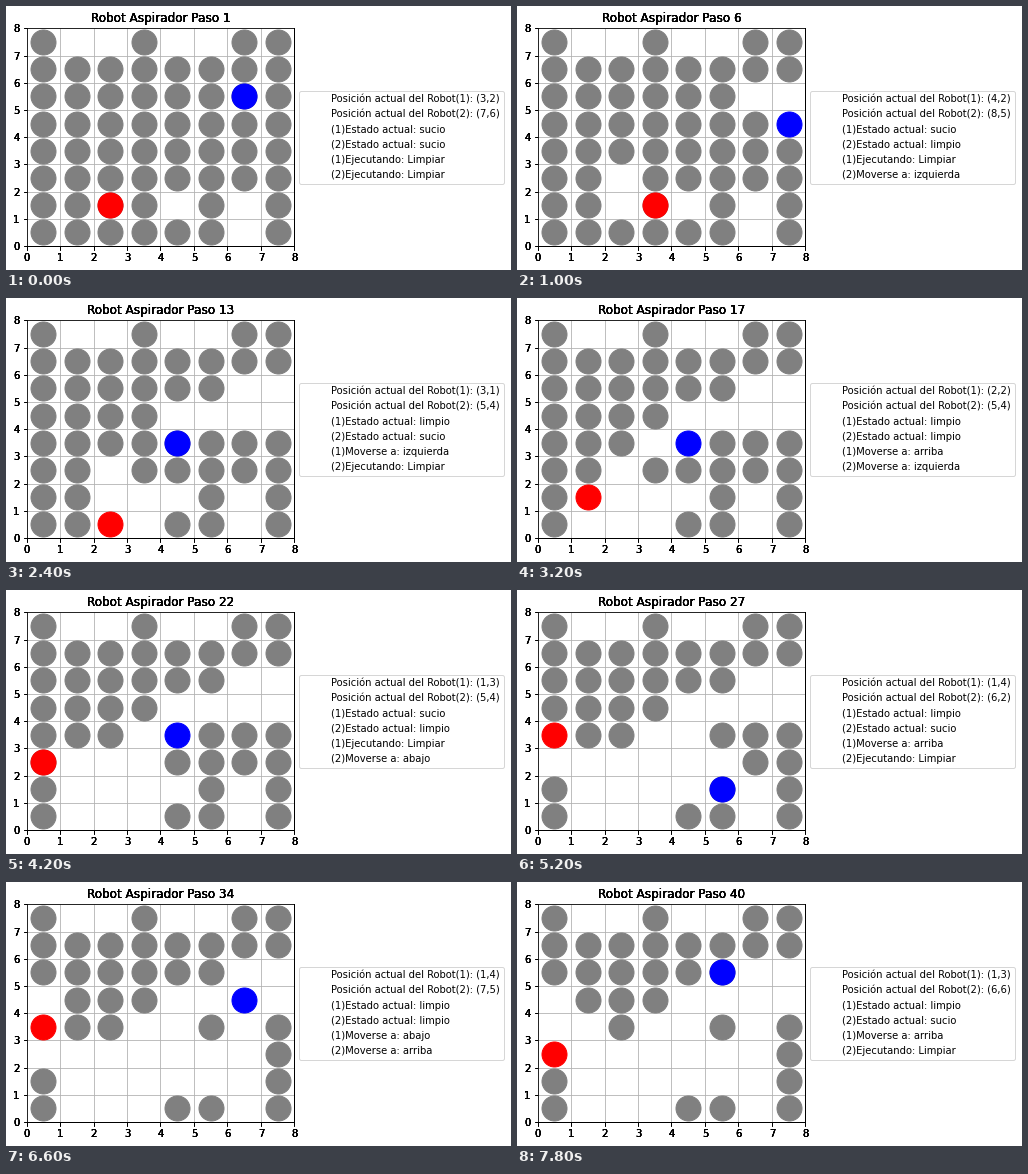
A matplotlib script that plays this animation: 505x264 px, repeating every 8000 ms.

```python
import matplotlib.pyplot as plt
from matplotlib.animation import FuncAnimation
from matplotlib.lines import Line2D

W, H, DPI = 505, 264, 72
STEPS, STEP_MS = 40, 200
LAYERS = 5  # stacked axes give the heavy title and tick labels

# Rows from top (y = 8) to bottom (y = 1); '#' is a dirty cell.
ROOM = ["#..#..##", "########", "########", "########",
        "########", "########", "####.#.#", "######.#"]

# One letter per step: C cleans, the others move.
MOVES = {"U": (0, 1, "arriba"), "D": (0, -1, "abajo"),
         "L": (-1, 0, "izquierda"), "R": (1, 0, "derecha")}
ROBOTS = [
    ((3, 2), "CUCDRCDCUDLCLCUCUCDULCUCDUUCDDUUDDURCLDU"),
    ((7, 6), "CRCDCLCLCLCDCLCRLDCURDCRCDCRUCUCUURLRLLC"),
]


def simulate():
    """Return dirt, robot positions and actions for every step."""
    dirt = {(x + 1, 8 - row) for row, line in enumerate(ROOM)
            for x, cell in enumerate(line) if cell == "#"}
    spots = [start for start, _ in ROBOTS]
    history = []
    for step in range(STEPS):
        acts = [plan[step] for _, plan in ROBOTS]
        history.append((sorted(dirt), list(spots), acts))
        for i, act in enumerate(acts):
            x, y = spots[i]
            if act == "C":
                dirt.discard((x, y))
            else:
                dx, dy, _ = MOVES[act]
                spots[i] = (x + dx, y + dy)
    return history


def legend_lines(spots, acts):
    where = [f"Posición actual del Robot({i}): ({x},{y})"
             for i, (x, y) in enumerate(spots, 1)]
    state = [f"({i})Estado actual: {'sucio' if a == 'C' else 'limpio'}"
             for i, a in enumerate(acts, 1)]
    doing = [f"({i})" + ("Ejecutando: Limpiar" if a == "C"
                         else f"Moverse a: {MOVES[a][2]}")
             for i, a in enumerate(acts, 1)]
    return where + state + doing


def centers(cells):
    return [x - 0.5 for x, _ in cells], [y - 0.5 for _, y in cells]


HISTORY = simulate()

plt.rcParams.update({"font.family": "DejaVu Sans", "font.size": 10})
fig = plt.figure(figsize=(W / DPI, H / DPI), dpi=DPI, facecolor="white")
box = [20.575 / W, 24.1 / H, 267.84 / W, 217.44 / H]

layers = []
for n in range(LAYERS):
    ax = fig.add_axes(box, label=f"layer{n}")
    ax.set(xlim=(0, 8), ylim=(0, 8), xticks=range(9), yticks=range(9))
    ax.grid(True)
    layers.append(ax)
titles = [a.set_title("Robot Aspirador Paso 1", fontsize=12) for a in layers]


def dots(color):
    return ax.plot([], [], "o", color=color, markersize=25)[0]


dirt_dots = dots("gray")
robot_dots = [dots("red"), dots("blue")]

blank = [Line2D([], [], linestyle="none") for _ in range(6)]
legend = ax.legend(blank, legend_lines(*HISTORY[0][1:]),
                   loc="center left", bbox_to_anchor=(1, 0.5))


def draw(step):
    dirt, spots, acts = HISTORY[step]
    dirt_dots.set_data(*centers(dirt))
    for dot, spot in zip(robot_dots, spots):
        dot.set_data(*centers([spot]))
    for title in titles:
        title.set_text(f"Robot Aspirador Paso {step + 1}")
    for text, line in zip(legend.get_texts(), legend_lines(spots, acts)):
        text.set_text(line)
    return [dirt_dots, *robot_dots, *titles, legend]


anim = FuncAnimation(fig, draw, frames=STEPS, interval=STEP_MS,
                     init_func=lambda: draw(0), repeat=True, repeat_delay=0,
                     blit=False)
plt.show()
```
